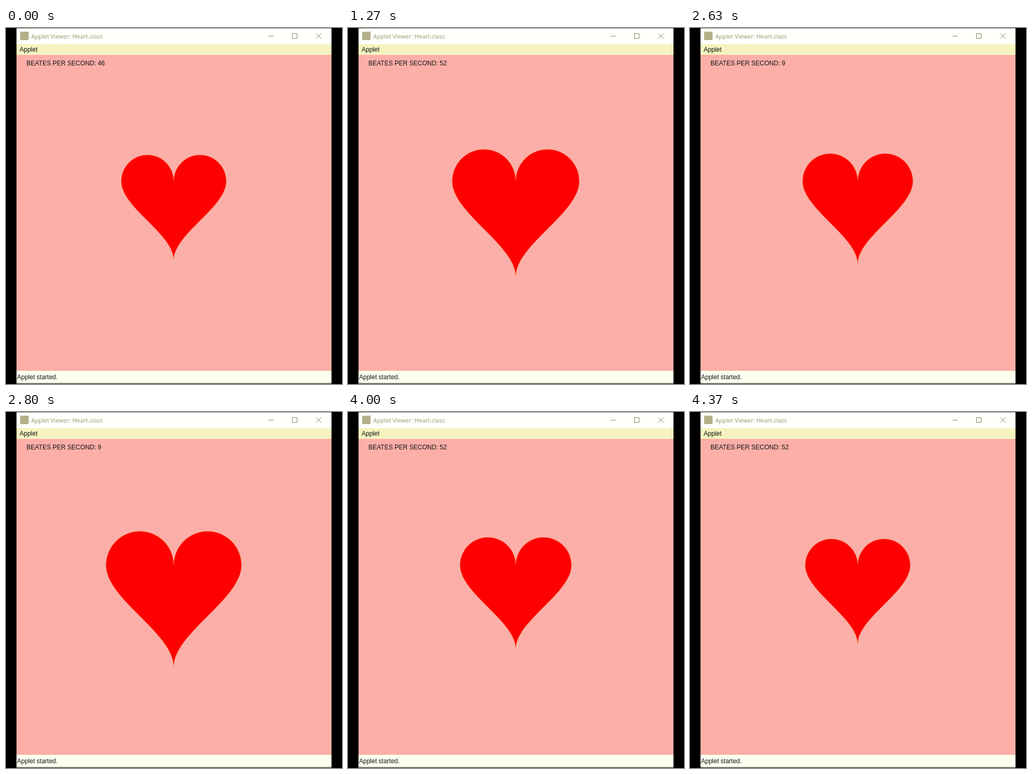
An HTML page that plays this animation: 640 by 676 pixels, repeating every 4.41 s.

```html
<!DOCTYPE html>
<html lang="en">
<head>
<meta charset="utf-8">
<title>Heartbeat</title>
<style>
  html, body { margin: 0; width: 100%; height: 100%; overflow: hidden; background: #000; }
  svg { display: block; width: 640px; height: 676px; }
  text { font: 12px "Liberation Sans", Arial, sans-serif; fill: #111; white-space: pre; }
  .title { font: 11.3px "Open Sans", "Noto Sans", sans-serif; fill: #98956a; }
  .controls { fill: none; stroke: #85825a; stroke-width: 1; }
</style>
</head>
<body>
<svg viewBox="0 0 640 676">
  <rect width="640" height="676" fill="#000"/>
  <rect x="20" width="600" height="676" fill="#77756a"/>
  <rect x="20" y="1" width="600" height="30" fill="#fffffb"/>
  <rect x="20" y="31" width="600" height="20" fill="#f5f3bf"/>
  <rect x="20" y="51" width="600" height="600" fill="#fbafa8"/>
  <rect x="20" y="651" width="600" height="23" fill="#fffff0"/>

  <rect x="27" y="7" width="16" height="16" fill="#b3b088"/>
  <text class="title" x="48" y="20">Applet Viewer: Heart.class</text>
  <g class="controls">
    <path d="M500 15.5H510M545.5 10.5h9v9h-9z"/>
    <path d="M591 10.5l10 10m0-10l-10 10"/>
  </g>

  <text x="26" y="45">Applet</text>
  <text id="rate" x="39" y="71"></text>
  <text x="21" y="667">Applet started.</text>

  <path id="heart" fill="#f00" stroke="#f08a28" stroke-opacity=".6" stroke-width=".6"
    vector-effect="non-scaling-stroke"
    d="M0 0A50 50 0 0 0-100 0C-100 50 0 100 0 150C0 100 100 50 100 0A50 50 0 0 0 0 0Z"/>
</svg>
<script>
  const LOOP = 4410, FPS = 30;
  const REST = 100, PEAK = 130, STEP = 5.2;

  // Each beat: first tick, tick of the largest size, rate shown
  const beats = [
    [0, -99, 46],
    [32, 36.27, 52],
    [39, 43.6, 43],
    [79, 83.8, 9],
    [120, 124.6, 52]
  ];

  const heart = document.getElementById('heart');
  const rate = document.getElementById('rate');

  function draw(ms) {
    const tick = Math.floor((ms % LOOP + 4) * FPS / 1000);
    const [, top, value] = beats.filter(b => b[0] <= tick).pop();
    const size = Math.max(REST, PEAK - STEP * Math.abs(tick - top));
    heart.setAttribute('transform', `translate(319.5 291) scale(${size / REST})`);
    rate.textContent = `BEATES PER SECOND: ${value}`;
  }

  const start = performance.now();
  function loop() {
    draw(performance.now() - start);
    requestAnimationFrame(loop);
  }
  loop();
</script>
</body>
</html>
```
